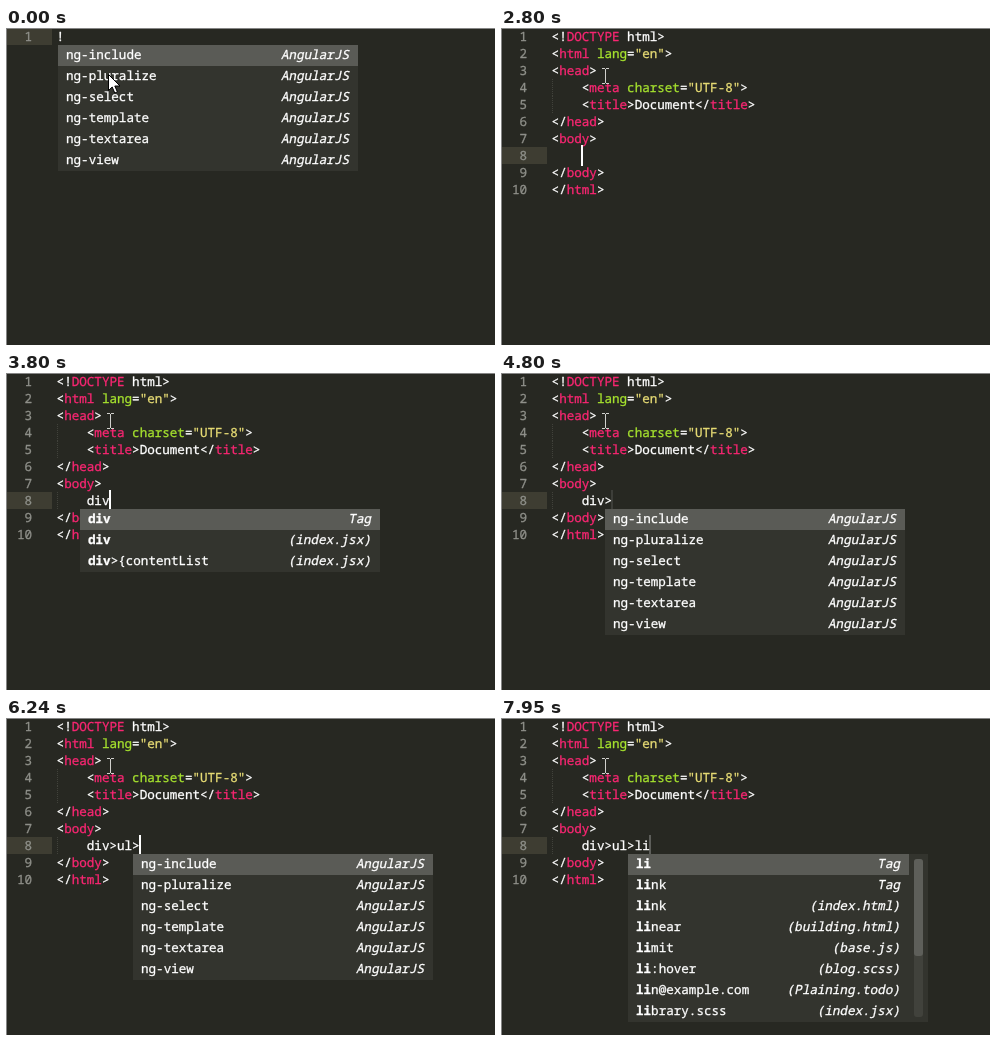
An HTML page with a canvas that plays this animation: 489 px wide and 317 px high, repeating every 8000 ms.

```html
<!DOCTYPE html>
<html lang="en">
<head>
<meta charset="UTF-8">
<title>Editor abbreviations</title>
<style>
  html, body { margin: 0; width: 100%; height: 100%; overflow: hidden; background: #272822; }
  canvas { display: block; }
</style>
</head>
<body>
<canvas id="stage" width="489" height="317"></canvas>
<script>
const ctx = document.getElementById('stage').getContext('2d');
const LOOP = 8000, ROW = 17, ITEM = 21;
const SIZE = 12.58, CHAR = SIZE * 0.6, LEFT = 50.6;
const WHITE = '#fff', PINK = '#f92672', GREEN = '#a6e22e', YELLOW = '#e6db74';

const colX = col => LEFT + col * CHAR;
const isWide = ch => ch > '\u2e80';
const advance = ch => isWide(ch) ? 14 : CHAR;
const textWidth = str => [...str].reduce((sum, ch) => sum + advance(ch), 0);

function rect(x, y, w, h, color) {
  ctx.fillStyle = color;
  ctx.fillRect(x, y, w, h);
}

// Monospaced text with a hairline stroke for a slightly heavier weight.
function text(str, x, y, color, { weight = 400, slant = 0 } = {}) {
  ctx.fillStyle = ctx.strokeStyle = color;
  ctx.lineWidth = 0.3;
  for (const ch of str) {
    ctx.font = isWide(ch)
      ? `${weight} 14px "Noto Sans CJK SC", "Noto Sans CJK", sans-serif`
      : `${weight} ${SIZE}px "Noto Sans Mono", monospace`;
    ctx.setTransform(1, 0, -slant, 1, x, y);
    ctx.fillText(ch, 0, 0);
    ctx.strokeText(ch, 0, 0);
    x += advance(ch);
  }
  ctx.resetTransform();
  return x;
}

// Colour runs of each line; '~' marks tag names, '@' attributes, '#' strings.
const PAGE = [
  '<!|~DOCTYPE| html>',
  '<|~html|@ lang|=|#"en"|>',
  '<|~head|>',
  '    <|~meta|@ charset|=|#"UTF-8"|>',
  '    <|~title|>Document</|~title|>',
  '</|~head|>',
  '<|~body|>',
  '',
  '</|~body|>',
  '</|~html|>'
];
const RUN_COLORS = { '~': PINK, '@': GREEN, '#': YELLOW };

// Completion list: typed query, column of the word, entries, scrollbar thumb height.
function list(query, col, entries, thumb = 0, width = 300) {
  const items = entries.trim().split('\n').map(line => line.trim().split('|'));
  return { query, col, items, thumb, width };
}

const NG = `ng-include|AngularJS
  ng-pluralize|AngularJS
  ng-select|AngularJS
  ng-template|AngularJS
  ng-textarea|AngularJS
  ng-view|AngularJS`;

const popups = {
  start: list('', 0, NG),
  d: list('d', 4, `div|Tag
    dd|Tag
    del|Tag
    dfn|Tag
    dl|Tag
    dt|Tag
    display|(base.js)
    data|(index.jsx)`, 44),
  di: list('di', 4, `div|Tag
    div|(index.jsx)
    div>{contentList|(index.jsx)
    display|(base.js)`),
  div: list('div', 4, `div|Tag
    div|(index.jsx)
    div>{contentList|(index.jsx)`),
  child: list('', 8, NG),
  u: list('u', 8, `ul|Tag
    url-loader?limit=10240&name|(base.js)
    url|(base.js)
    use|(base.js)
    utf-8|(index.html)
    underline|(template.html)
    update|(index.jsx)
    user|(index.jsx)`, 60, 310),
  ul: list('ul', 8, `ul|Tag
    url-loader?limit=10240&name|(base.js)
    url|(base.js)
    underline|(template.html)`),
  grandchild: list('', 11, NG),
  l: list('l', 11, `lorem|Lorem ipsum
    li|Tag
    label|Tag
    legend|Tag
    link|Tag
    lang
    loaders|(遇到的问题.todo)
    left|(遇到的问题.todo)`, 44),
  li: list('li', 11, `li|Tag
    link|Tag
    link|(index.html)
    linear|(building.html)
    limit|(base.js)
    li:hover|(blog.scss)
    lin@example.com|(Plaining.todo)
    library.scss|(index.jsx)`, 97)
};

// Each step changes part of the state; caret is its opacity.
const DIM = 0.65, OFF = 0.1, RISING = 0.25;
const typed = (code, popup) => ({ code: '    ' + code, col: 4 + code.length, caret: 1, popup });
const steps = [
  [0, { expanded: false, line: 1, col: 1, caret: 0, code: '', popup: 'start' }],
  [440, { caret: RISING }],
  [590, { expanded: true, selected: true, line: 5, col: 19, caret: 1, popup: null }],
  [990, { caret: DIM }],
  [1110, { caret: OFF }],
  [1520, { caret: RISING }],
  [1670, { caret: 1 }],
  [1800, { selected: false, line: 6, col: 7 }],
  [2240, { line: 7, col: 6 }],
  [2520, { caret: DIM }],
  [2670, { caret: OFF }],
  [2800, { line: 8, col: 4, caret: 1 }],
  [3240, { caret: DIM }],
  [3390, { caret: OFF }],
  [3520, typed('d', 'd')],
  [3670, typed('di', 'di')],
  [3800, typed('div', 'div')],
  [4240, typed('div>', 'child')],
  [4670, { caret: DIM }],
  [4800, { caret: OFF }],
  [4950, typed('div>u', 'u')],
  [5080, typed('div>ul', 'ul')],
  [5520, { caret: DIM }],
  [5670, { caret: RISING }],
  [6080, { popup: null }],
  [6240, typed('div>ul>', 'grandchild')],
  [6520, { caret: DIM }],
  [6670, { caret: OFF }],
  [6800, typed('div>ul>l', 'l')],
  [6950, typed('div>ul>li', 'li')],
  [7390, { caret: DIM }],
  [7520, { caret: OFF }],
  [7950, { caret: RISING }]
];

function drawCodeLine(source, number) {
  const top = (number - 1) * ROW;
  const label = String(number);
  text(label, 26 - textWidth(label), top + 13, '#8f908a');
  if (source.startsWith('    ')) {
    for (let y = top; y < top + ROW; y += 2) rect(51, y, 1, 1, '#41423b');
  }
  let x = LEFT;
  for (const run of source.split('|')) {
    const color = RUN_COLORS[run[0]];
    x = text(color ? run.slice(1) : run, x, top + 13, color || WHITE);
  }
}

function drawSelection(top) {
  const x = Math.round(colX(11)), width = Math.round(8 * CHAR) + 1;
  rect(x, top, width, ROW, '#222218');
  rect(x + 1, top + 1, width - 2, ROW - 2, '#49483e');
}

function drawPopup({ query, col, items, thumb, width }, line) {
  const x = Math.max(52, Math.round(colX(col) - 7)), y = line * ROW;
  const listWidth = thumb ? width - 19 : width;
  rect(x, y, width, items.length * ITEM, '#33342e');
  rect(x, y, listWidth, ITEM, '#5a5b56');
  items.forEach(([name, note = ''], i) => {
    const base = y + i * ITEM + 14;
    let pen = x + 8, matched = 0;
    for (const ch of name) {
      const hit = ch === query[matched];
      if (hit) matched++;
      pen = text(ch, pen, base, WHITE, { weight: hit ? 700 : 400 });
    }
    text(note, x + listWidth - 9 - textWidth(note), base, WHITE, { slant: 0.2 });
  });
  if (thumb) {
    drawBar(x + width - 14, y + 5, items.length * ITEM - 10, '#41423c');
    drawBar(x + width - 14, y + 5, thumb, '#5e5f5a');
  }
}

function drawBar(x, y, height, color) {
  ctx.beginPath();
  ctx.roundRect(x, y, 9, height, 3);
  ctx.fillStyle = color;
  ctx.fill();
}

function drawArrow() {
  const path = new Path2D('M102.5 46.5v16l3.7-3.5 2.6 6 2.6-1.1-2.6-5.9h5.2z');
  ctx.fillStyle = '#fff';
  ctx.fill(path);
  ctx.strokeStyle = '#000';
  ctx.lineWidth = 1;
  ctx.stroke(path);
}

function drawBeam() {
  const color = '#d0d0cc';
  rect(104, 41, 1, 14, color);
  for (const y of [40, 55]) {
    rect(101, y, 3, 1, color);
    rect(105, y, 3, 1, color);
  }
}

function draw(time) {
  const state = Object.assign({}, ...steps.filter(([at]) => at <= time).map(([, change]) => change));
  const top = (state.line - 1) * ROW;
  rect(0, 0, 489, 317, '#272822');
  rect(1, top, 45, ROW, '#3e3d32');
  if (state.selected) drawSelection(top);

  const lines = state.expanded ? PAGE : ['!'];
  lines.forEach((source, i) => drawCodeLine(i === 7 ? state.code : source, i + 1));

  ctx.globalAlpha = state.caret;
  rect(Math.floor(colX(state.col)), top - 2, 2, 21, WHITE);
  ctx.globalAlpha = 1;

  if (state.popup) drawPopup(popups[state.popup], state.line);
  if (state.expanded) drawBeam(); else drawArrow();
  rect(0, 0, 489, 1, '#858585');
  rect(0, 0, 1, 317, '#858585');
}

ctx.textRendering = 'geometricPrecision';
ctx.lineJoin = 'round';
const began = performance.now();
function tick() {
  draw((performance.now() - began) % LOOP);
  requestAnimationFrame(tick);
}
tick();
</script>
</body>
</html>
```
